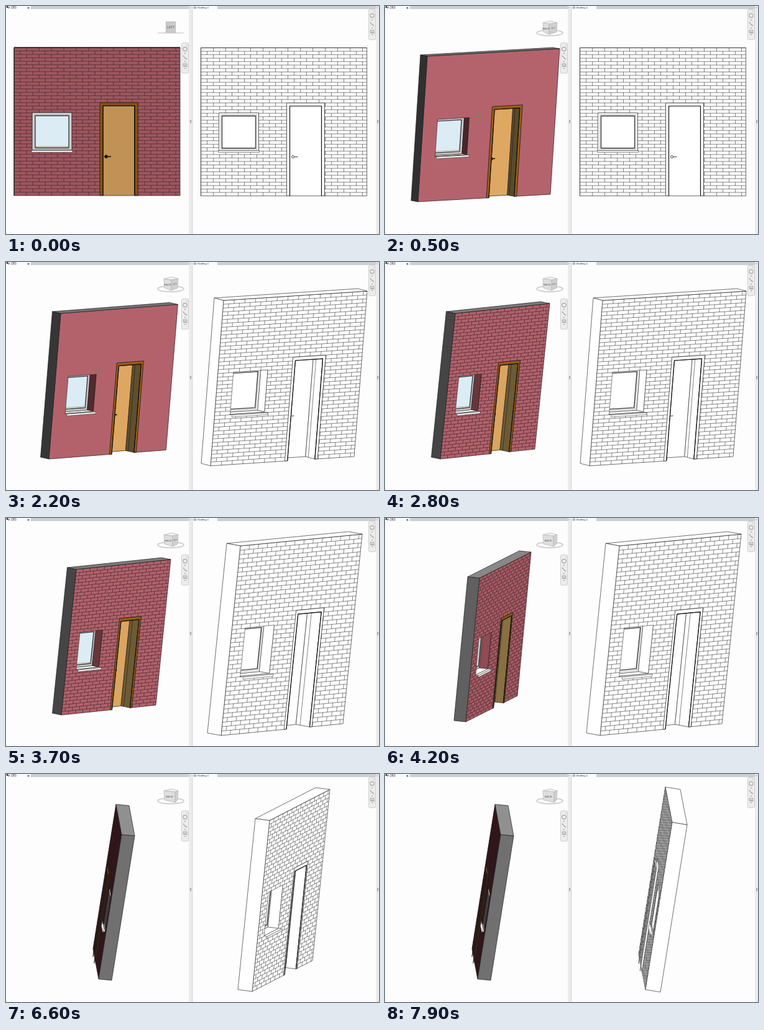
Recreate the animation shown at these times as an HTML page with a canvas. Size 600 by 368 pixels, loop 8 s.

```html
<!DOCTYPE html>
<html lang="en">
<head>
<meta charset="utf-8">
<title>Wall views</title>
<style>
html, body { margin: 0; width: 600px; height: 368px; overflow: hidden; background: #fdfdfd; }
canvas { display: block; }
</style>
</head>
<body>
<canvas id="stage" width="600" height="368"></canvas>
<script>
const c = document.getElementById('stage').getContext('2d');
const W = 267, H = 239, LOOP = 8000, STEP = 100;

// origin, width, height and depth vectors; brightness, end-face grey, cube edge
const orbit = [
  [13, 67, 267, 0, 0, 239, 0, 0, .87, 48, 273],
  [68, 81, 213, -12, -15, 235, -11, -2, 1, 48, 264],
  [78, 83, 203, -14, -17, 235, -13, -3, 1, 48, 265],
  [113, 83, 152, -16, -24, 235, -14.5, -3, .98, 69, 268],
  [152, 97, 83, -42, -22, 232, -19, -2, .92, 96, 271],
  [207, 100, -9, -49, -37, 233, -21, -2, .9, 112, 272]
];
const orbitKeys = [[0, 0], [100, 0], [500, 1], [800, 2], [2000, 2], [2700, 3],
  [3700, 3], [4200, 4], [5800, 4], [6400, 5], [LOOP, 5]];
const drafts = [
  [0, [313.5, 67.5, 267, 0, 0, 239, 0, 0]],
  [1300, [350, 62, 231, -15, -21, 267, -15, -4]],
  [3300, [377, 45, 196, -19, -31, 306, -22, -4]],
  [5600, [424, 75, 97, -50, -28, 276, -23, -3]],
  [7500, [486, 82, -11, -57, -43, 270, -24, -4]]
];

const rgb = (r, g, b, k = 1) => `rgb(${r * k},${g * k},${b * k})`;

function poly(pts, fill, stroke, width = .7, open) {
  c.beginPath();
  pts.forEach(p => c.lineTo(...p));
  if (!open) c.closePath();
  if (fill) { c.fillStyle = fill; c.fill(); }
  if (stroke) { c.strokeStyle = stroke; c.lineWidth = width; c.stroke(); }
}

function box(x, y, w, h, fill, stroke) {
  poly([[x, y], [x + w, y], [x + w, y + h], [x, y + h]], fill, stroke);
}

function label(s, x, y, size, color, align = 'left', weight = '') {
  c.font = `${weight} ${size}px "Liberation Sans", Arial, sans-serif`;
  c.textAlign = align;
  c.fillStyle = color;
  c.fillText(s, x, y);
}

function clipTo(pts, draw) {
  c.save();
  poly(pts);
  c.clip();
  draw();
  c.restore();
}

function bricks(P, z, color) {
  const row = H / 43, len = 20;
  c.beginPath();
  for (let i = 0; i < 43; i++) {
    const y = i * row;
    c.moveTo(...P(0, y, z));
    c.lineTo(...P(W, y, z));
    for (let x = i % 2 ? len / 2 : len; x < W; x += len) {
      c.moveTo(...P(x, y, z));
      c.lineTo(...P(x, y + row, z));
    }
  }
  c.strokeStyle = color;
  c.lineWidth = .7;
  c.stroke();
}

function wall(pose, colored, hatched) {
  const [ox, oy, ux, uy, vx, vy, dx, dy, b, g] = pose;
  const P = (x, y, z = 0) => [
    ox + ux * x / W + vx * y / H + dx * z,
    oy + uy * x / W + vy * y / H + dy * z];
  const quad = (x0, y0, x1, y1, z) => [P(x0, y0, z), P(x1, y0, z), P(x1, y1, z), P(x0, y1, z)];
  const side = (x, y0, y1, z0, z1) => [P(x, y0, z0), P(x, y0, z1), P(x, y1, z1), P(x, y1, z0)];
  const flat = (y, x0, x1, z0, z1) => [P(x0, y, z0), P(x1, y, z0), P(x1, y, z1), P(x0, y, z1)];
  const frame = z => [[138, 239], [138, 89], [199, 89], [199, 239],
    [194, 239], [194, 94], [143, 94], [143, 239]].map(([x, y]) => P(x, y, z));
  const paint = (...color) => colored ? rgb(...color) : '#fff';
  const ink = colored ? '#1c1a1a' : '#333';
  const front = ux * vy - uy * vx > 0, z = front ? 0 : 1;

  poly(quad(0, 0, W, H, z), front ? paint(180, 99, 109, b) : paint(66, 30, 35), ink);
  if (hatched) bricks(P, z, colored ? 'rgba(35,18,22,.72)' : 'rgba(0,0,0,.68)');

  if (front) {
    clipTo(quad(29, 105, 93, 166), () => {
      poly(quad(29, 105, 93, 166), paint(150, 78, 86, g / 100));
      poly(side(93, 105, 166, 0, .75), null, ink);
      poly(flat(166, 29, 93, 0, .75), '#fff', ink, .5);
      poly(quad(29, 105, 93, 166, .75), paint(222, 224, 225), ink);
      poly(quad(32, 108, 90, 164, .75), null, '#888', .6);
      poly(quad(34, 110, 88, 162, .75), paint(220, 236, 244), '#333', 1.3);
      if (colored) poly(quad(35, 159, 87, 161, .75), '#c8c2a8');
    });
    poly(quad(29, 105, 93, 166), null, ink, .6);
    poly(flat(166, 28, 94, 0, -.25), '#fff', ink, .5);
    poly(quad(28, 166, 94, 169, -.25), '#f4f4f4', ink, .5);

    clipTo(quad(143, 94, 194, 240), () => {
      poly(quad(143, 94, 194, 241), '#fdfdfd');
      poly(quad(143, 94, 194, 239, 1), paint(222, 168, 98, b), ink);
      poly(side(194, 94, 239, 0, 1), paint(210, 174, 102, .2 + g / 215), ink);
      poly([P(194, 94, .7), P(194, 239, .7)], null, ink, .6, true);
      const knob = P(148, 176, .4);
      poly([knob, P(156, 176, .4)], null, '#111', colored ? 1.6 : .8, true);
      c.beginPath();
      c.arc(...knob, 2, 0, 7);
      c.fillStyle = colored ? '#111' : '#fff';
      c.fill();
      c.stroke();
    });
    poly(frame(0), paint(156, 94, 18, b), ink, .8);
    poly([P(143, 239), P(143, 94), P(194, 94), P(194, 239)], null, '#111', 1.2, true);
  } else {
    poly(quad(138, 89, 199, 239, 1), paint(58, 34, 18), ink);
    poly(frame(1.12), paint(150, 92, 20), ink, .6);
    poly(quad(29, 105, 93, 166, 1), '#f4f4f4', ink, .8);
    poly(quad(34, 110, 88, 162, 1), paint(70, 62, 62), ink, .6);
    poly(flat(166, 28, 94, 1, 1.15), '#fff', ink, .5);
    poly(quad(28, 160, 94, 169, 1.15), '#fff', ink, .5);
  }
  poly(flat(0, 0, W, 0, 1), paint(1, 1, 1, 88 + g * .5), ink);
  poly(side(0, 0, H, 0, 1), paint(1, 1, 1, g), ink);
}

function viewCube(edge, turned) {
  c.beginPath();
  c.ellipse(265, 43.5, 21, turned ? 4.5 : .6, 0, 0, 7);
  c.strokeStyle = '#d2d2d2';
  c.lineWidth = turned ? 2 : 1;
  c.stroke();
  if (!turned) {
    box(257.5, 25.5, 15, 17, '#cbcbcb', '#aaa');
    label('LEFT', 265, 36, 5, '#777', 'center', 'bold');
    return;
  }
  const line = '#b5b5b5';
  poly([[254, 27], [266, 24], [277, 27], [edge, 29]], '#f1f1f1', line);
  poly([[254, 27], [edge, 29], [edge, 46], [255, 42]], '#dedede', line);
  poly([[edge, 29], [277, 27], [276, 42], [edge, 46]], '#d0d0d0', line);
  label('BACK', (254 + edge) / 2, 38, 4, '#777', 'center', 'bold');
  if (edge < 270) label('LEFT', (edge + 277) / 2, 37, 3, '#888', 'center', 'bold');
}

function navBar(x, y) {
  c.beginPath();
  c.roundRect(x + .5, y + .5, 11, 49, 2);
  c.fillStyle = '#ececec';
  c.fill();
  c.strokeStyle = '#cfcfcf';
  c.lineWidth = 1;
  c.stroke();
  label('×', x + 9, y + 5, 4, '#888', 'center');
  c.beginPath();
  c.arc(x + 6, y + 10.5, 3.5, 0, 7);
  c.fillStyle = '#d6d6d6';
  c.fill();
  c.strokeStyle = '#999';
  c.lineWidth = .8;
  c.stroke();
  box(x + 4, y + 9.5, 4, 2, '#f6f6f6');
  for (const dy of [17, 30, 41]) box(x + 5, y + dy, 2, 1, '#888');
  poly([[x + 3, y + 21], [x + 6, y + 25], [x + 9, y + 27]], null, '#999', 1.2, true);
  box(x + 3, y + 34, 6, 3, '#ddd', '#999');
  box(x + 3, y + 38, 7, 1, '#999');
}

function chrome() {
  box(0, 0, 600, 5, '#cfcfcf');
  box(0, 0, 40, 5, '#fafafa');
  box(300, 0, 40, 5, '#fafafa');
  box(294, 0, 6, 368, '#ececec');
  box(299.5, 0, .7, 368, '#c4c4c4');
  box(595, 0, 5, 368, '#ececec');
  for (const x of [296, 597]) {
    box(x, 184, .7, 5, '#888');
    box(x + 1.3, 184, .7, 5, '#888');
    label('×', x, 4, 4, '#444', 'center');
  }
  box(1, 0, 2, 3, '#333');
  box(3.5, 1, 2, 3, '#777');
  label('{3D}', 8, 4, 4.5, '#222');
  label('×', 36, 4.5, 6, '#111', 'center', 'bold');
  poly([[302, 2], [304, .5], [306, 2], [306, 4], [302, 4]], '#bbb', '#888', .5);
  label('Drafting 1', 308, 4, 4.2, '#333');
}

function orbitAt(t) {
  const i = orbitKeys.findLastIndex(k => k[0] <= t);
  const [t0, a] = orbitKeys[i], [t1, b] = orbitKeys[i + 1];
  const k = (t - t0) / (t1 - t0);
  return {
    pose: orbit[a].map((v, j) => v + (orbit[b][j] - v) * k),
    moving: a !== b && (k > 0 || t === 500)
  };
}

function draw(now) {
  const t = Math.floor(now % LOOP / STEP) * STEP;
  const { pose, moving } = orbitAt(t);
  c.lineJoin = 'round';
  c.fillStyle = '#fdfdfd';
  c.fillRect(0, 0, 600, 368);
  wall(pose, true, !moving);
  if (moving) {
    for (let x = 142; x < 153; x += 2.5) box(x, 175 + x % 2, 1.5, 3, '#7f8248');
  }
  wall([...drafts.findLast(d => d[0] <= t)[1], 1, 100], false, true);
  viewCube(pose[10], t > 100);
  navBar(282, 59);
  navBar(583, 5);
  chrome();
}

const start = performance.now();
function tick() {
  draw(performance.now() - start);
  requestAnimationFrame(tick);
}
tick();
</script>
</body>
</html>
```
